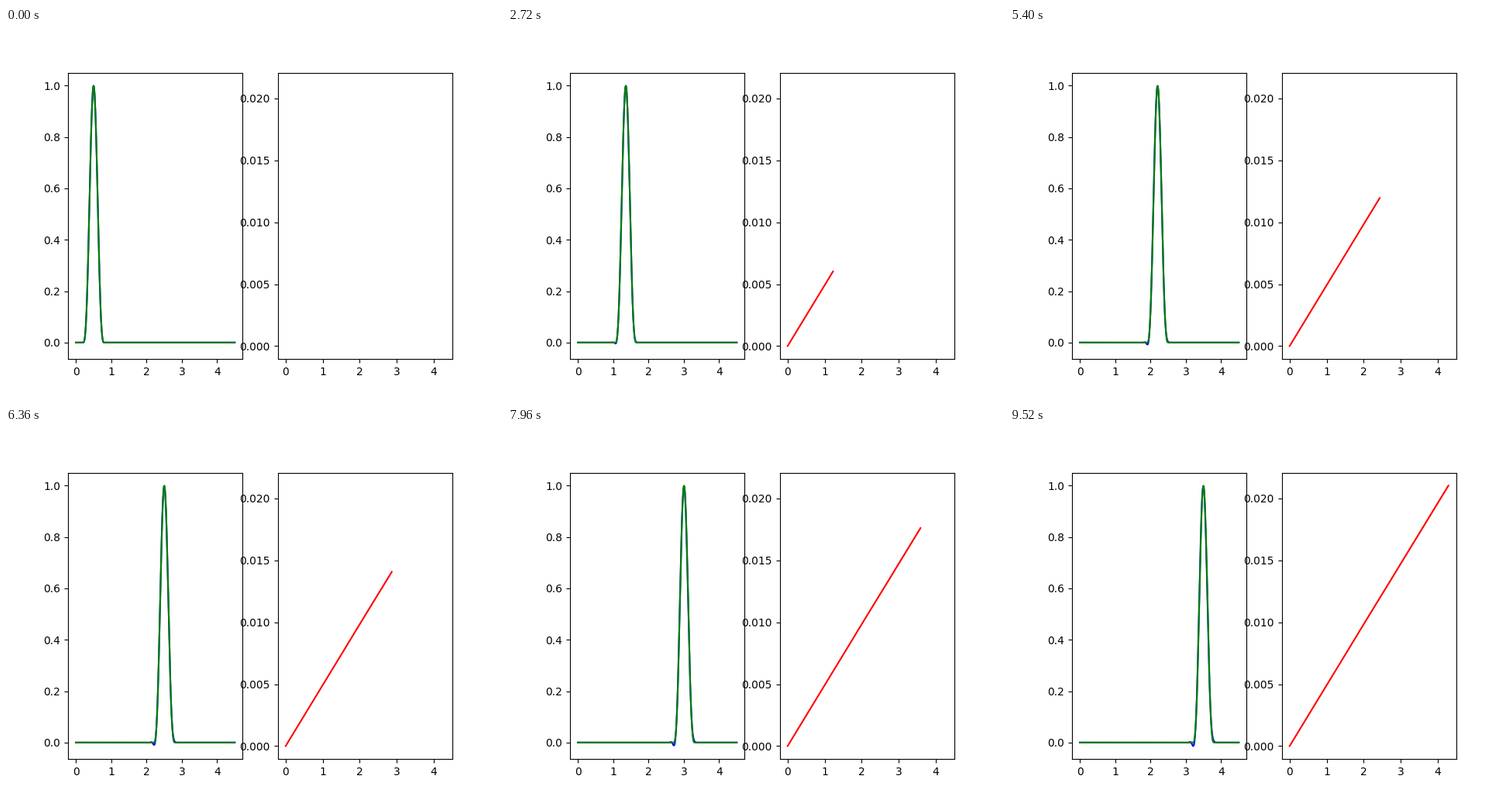
A matplotlib script that plays this animation: 640 by 480 pixels, repeating every 9.54 s.

```python
import numpy as np
import matplotlib.pyplot as plt
from matplotlib.animation import FuncAnimation

SPEED = 0.7
LENGTH = 4.5
CELLS = 500
STEPS = 476
DX = DT = LENGTH / CELLS
CFL = SPEED * DT / DX

x = np.linspace(0, LENGTH, CELLS + 1)
t = np.arange(STEPS + 1) * DT


def pulse(s):
    """Smooth bump of height 1 on 0.2 < s < 0.8."""
    d = s - 0.5
    return np.where(np.abs(d) < 0.3, np.cos(np.pi * d / 0.6) ** 3, 0.0)


def lax_wendroff(u):
    new = u.copy()
    left, mid, right = u[:-2], u[1:-1], u[2:]
    new[1:-1] = (mid - CFL / 2 * (right - left)
                 + CFL ** 2 / 2 * (right - 2 * mid + left))
    return new


exact = np.array([pulse(x - SPEED * now) for now in t])
approx = np.empty_like(exact)
approx[0] = exact[0]
for k in range(STEPS):
    approx[k + 1] = lax_wendroff(approx[k])
error = np.abs(approx - exact).max(axis=1)


def padded(lo, hi):
    pad = 0.05 * (hi - lo)
    return lo - pad, hi + pad


fig, (wave_ax, err_ax) = plt.subplots(1, 2, figsize=(6.4, 4.8), dpi=100)
wave_ax.set(xlim=padded(0, LENGTH),
            ylim=padded(approx.min(), max(approx.max(), exact.max())))
err_ax.set(xlim=padded(0, t[-1]), ylim=padded(0, error.max()))

approx_line, = wave_ax.plot([], [], "b")
exact_line, = wave_ax.plot([], [], "g")
error_line, = err_ax.plot([], [], "r")


def update(k):
    approx_line.set_data(x, approx[k])
    exact_line.set_data(x, exact[k])
    error_line.set_data(t[:k + 1], error[:k + 1])
    return approx_line, exact_line, error_line


anim = FuncAnimation(fig, update, frames=STEPS + 1, interval=20,
                     repeat=True, repeat_delay=0)
plt.show()
```
